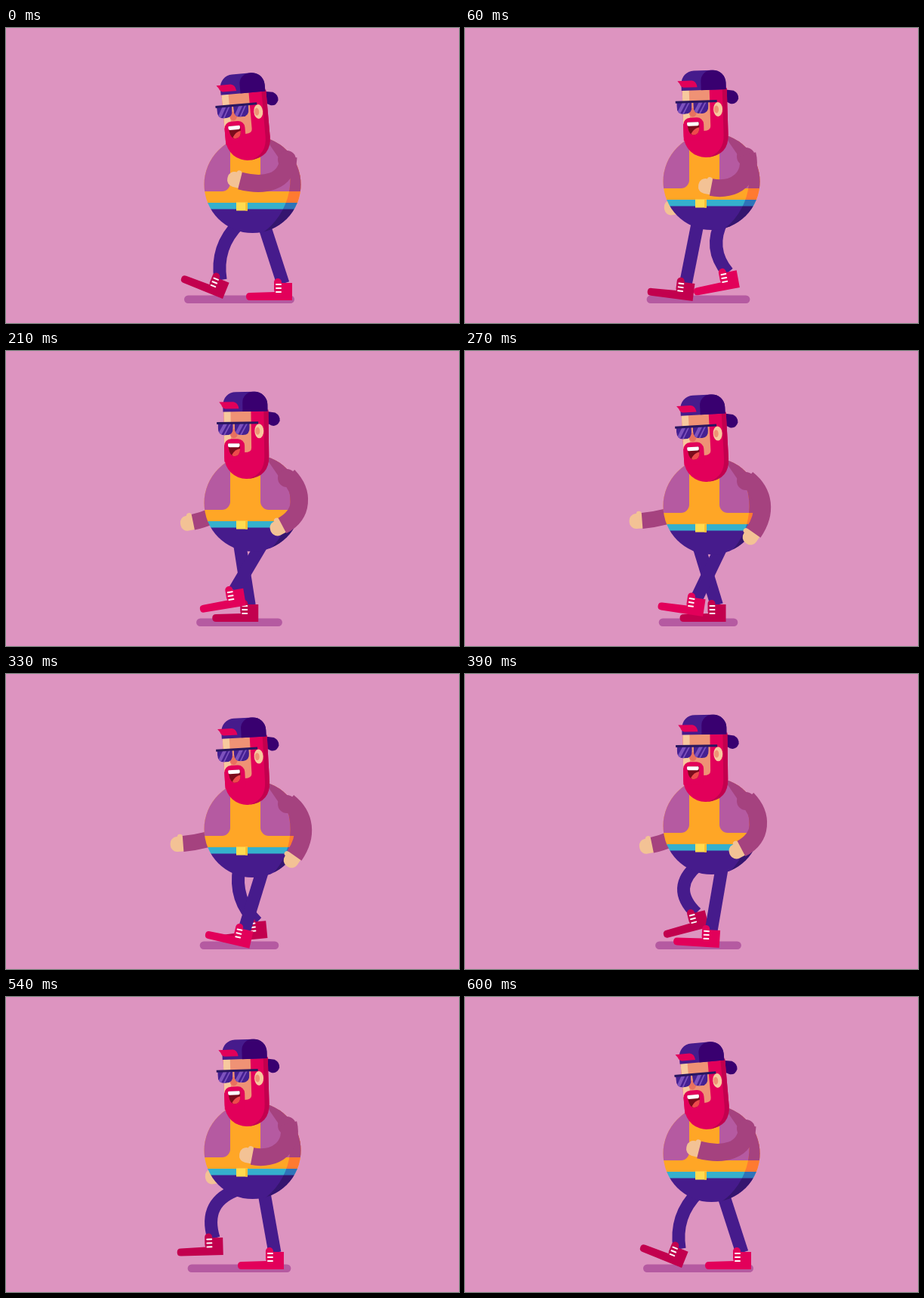
An HTML page with a canvas for the animation above (630 ms loop, 600 by 390 pixels).

```html
<!DOCTYPE html>
<html lang="en">
<head>
<meta charset="utf-8">
<title>Walk cycle</title>
<style>
html, body { margin: 0; width: 100%; height: 100%; overflow: hidden; background: #dd94c0; }
canvas { display: block; }
</style>
</head>
<body>
<canvas id="stage" width="600" height="390"></canvas>
<script>
const ctx = document.getElementById('stage').getContext('2d');
const { PI, sin, cos, max, min, hypot } = Math;
const STEP = 30, STEPS = 20, LOOP = 630;
const PURPLE = '#461b8c', DEEP = '#35156f', CAP = '#390070';
const RED = '#e2005a', DARK_RED = '#c2004e';
const SLEEVE = '#a5427f', JACKET = '#b55aa1';
const SKIN = '#f3c295', LIGHT_SKIN = '#f7c99e', DARK_SKIN = '#ef9275';

function fill(color, path) {
  ctx.fillStyle = color;
  ctx.fill(new Path2D(path));
}

function stroke(color, width, path) {
  ctx.strokeStyle = color;
  ctx.lineWidth = width;
  ctx.stroke(new Path2D(path));
}

function ellipse(color, x, y, rx, ry = rx) {
  ctx.fillStyle = color;
  ctx.beginPath();
  ctx.ellipse(x, y, rx, ry, 0, 0, 7);
  ctx.fill();
}

function box(color, x, y, w, h, r = 0) {
  ctx.fillStyle = color;
  ctx.beginPath();
  ctx.roundRect(x, y, w, h, r);
  ctx.fill();
}

function at(x, y, angle, draw) {
  ctx.save();
  ctx.translate(x, y);
  ctx.rotate(angle);
  draw();
  ctx.restore();
}

// Heel position and foot angle: swinging for the first half, planted for the second.
function stride(phase) {
  const q = phase % 10 / 10;
  if (phase < 10) {
    const u = 1 - (1 - q) ** 1.7;
    return {
      x: 379 - 64 * u * u * (3 - 2 * u),
      y: 360 - 29 * sin(PI * q),
      degrees: 22 * q ** 4 - 18 * sin(PI * q)
    };
  }
  return {
    x: 315 + 64 * q + 3 * sin(PI * q),
    y: 360 + 3 * sin(PI * (1 - q) ** 4),
    degrees: 22 * (1 - q) ** 5
  };
}

function shoe(color) {
  box(color, -24, -29, 10, 20, 5);
  fill(color, 'M0 0H-56Q-61 0 -61 -5Q-61 -10 -56 -10L-23 -11V-19L-14 -23H0Z');
  for (let y = -22; y < -10; y += 5) box('#fff', -22, y, 8, 2, 1);
}

function leg(phase, hipX, hipY, shiftX, shiftY, bend, color) {
  const foot = stride(phase), a = foot.degrees * PI / 180;
  const x = foot.x + shiftX, y = foot.y + shiftY;
  const ankleX = x - 12 * cos(a) + 22 * sin(a), ankleY = y - 12 * sin(a) - 22 * cos(a);
  const dx = ankleX - hipX, dy = ankleY - hipY, k = max(0, bend) / hypot(dx, dy);
  const kneeX = hipX + dx / 2 - dy * k, kneeY = hipY + dy / 2 + dx * k;
  stroke(PURPLE, 17, `M${hipX} ${hipY}Q${kneeX} ${kneeY} ${ankleX} ${ankleY}`);
  at(x, y, a, () => shoe(color));
}

function arm(shoulderX, shoulderY, elbowX, elbowY, x, y, angle, width) {
  at(x, y, angle, () => {
    box(SKIN, -1, -10, 18, 20, [0, 9, 9, 2]);
    box(SKIN, 0, 2, 7, 11, 3.5);
  });
  const wristX = x - 32 * cos(angle), wristY = y - 32 * sin(angle);
  stroke(SLEEVE, width,
    `M${shoulderX} ${shoulderY}C${elbowX} ${elbowY} ${wristX} ${wristY} ${x} ${y}`);
}

function backArm(s) {
  arm(300, 202, 285, 206, 294 - 66 * s, 233 - 18 * s * s, PI - 0.25 * sin(PI * s), 21);
}

function frontArm(s) {
  const out = 1 - (1 - s) ** 2;
  ellipse(SLEEVE, 372, 166, 12);
  arm(374, 163, 373 + 24 * out, 197 - 18 * s,
    310 + 80 * s, 194 + 68 * s - 26 * s * s, PI + 0.25 - 1.5 * s * s, 23);
}

function clothes(jacket, shirt, belt, pants) {
  box(shirt, 260, 130, 132, 94);
  box(jacket, 250, 130, 47, 78, [0, 0, 11, 0]);
  box(jacket, 337, 130, 60, 78, [0, 0, 0, 11]);
  box(belt, 260, 223, 132, 9);
  box(pants, 260, 231.5, 132, 34);
}

function body(s) {
  at(0, 0, 0, () => {
    ctx.beginPath();
    ctx.arc(326.5, 199, 64, 0, 7);
    ctx.clip();
    clothes(JACKET, '#ffa626', '#35b0cd', PURPLE);
    at(0, 0, 0, () => {
      ctx.beginPath();
      ctx.rect(250, 120, 150, 150);
      ctx.arc(290, 192 + 8 * s, 86.5, 0, 7);
      ctx.clip('evenodd');
      clothes(SLEEVE, '#ff7a30', '#2e74b9', DEEP);
    });
    fill(SLEEVE, 'M338 130L362 165H395V130Z');
  });
  box('#ffdb50', 305, 222.5, 15, 11);
  box('#ffbf35', 317, 222.5, 3, 11);
}

function lens(x) {
  at(x, 93, 0, () => {
    ctx.clip(new Path2D('M0 0H20V6Q20 16 11 16H9Q0 16 0 6Z'));
    box('#452092', 0, 0, 20, 16);
    fill('#7d52bd', 'M8 0H13L4 16H-1ZM16 0H18L9 16H7Z');
  });
}

function head() {
  fill(CAP, 'M345 78L357 80Q364 84 363 91Q360 99 352 97L345 93Z');
  // hair, beard and its shaded side
  box(RED, 289, 76, 59, 91, [0, 0, 29, 29]);
  fill(DARK_RED, 'M342 77H348V138Q348 165 320 167Q342 161 342 138Z');
  // face
  fill(DARK_SKIN, 'M289 76H325V126Q325 132 316 132L306 122H289Z');
  box(LIGHT_SKIN, 289, 76, 9, 46);
  ellipse('#e8715f', 302, 107, 5, 6);
  box(RED, 289, 114, 27, 30, [9, 9, 0, 0]);
  ellipse(LIGHT_SKIN, 335.5, 104, 6, 9.5);
  ellipse(DARK_SKIN, 333.5, 104, 3, 5);
  // mouth
  fill('#7c0b1c', 'M294 120H310V127Q310 137 302 137Q296 136 295 127Z');
  fill('#ee4a4c', 'M310 127Q310 137 302 137Q300 137 299 135Q303 128 310 127Z');
  box('#fff', 294, 120, 15.5, 5, [1, 1, 2, 2]);
  // sunglasses
  lens(281);
  lens(303);
  box('#291660', 279.5, 91.5, 55, 3);
  // cap
  box(PURPLE, 288, 52, 59, 26, [17, 17, 0, 0]);
  box(CAP, 314, 52, 33, 26, [14, 17, 0, 0]);
  fill(RED, 'M283 65H302Q308 66 309 74H291Q287 73 286 69Z');
}

function draw(n) {
  const swing = min(n, STEPS - n), s = swing / 10;
  const lift = min(swing, 10 - swing) / 5;
  const bob = 8 - 10 * lift;
  const half = 73 - 23 * s;
  const backPhase = (n + 10) % STEPS;

  ctx.fillStyle = '#dd94c0';
  ctx.fillRect(0, 0, 600, 390);
  box('#b55aa1', 309 - half, 353.5, half * 2, 10.5, 5.25);

  at(0, bob, 0, () => backArm(s));
  leg(backPhase, 309, 250 + bob, -28, -2, 44 * sin(PI * (backPhase + 1) / 13), DARK_RED);
  leg(n, 341, 250 + bob, 0, 0, n < 7 ? 30 * sin(PI * n / 7) : 0, RED);
  at(0, bob, 0, () => {
    body(s);
    frontArm(s);
    at(318, 118, -5 * (1 - lift) ** 2 * PI / 180, () => {
      ctx.translate(-318, -118);
      head();
    });
  });
}

function tick(now) {
  draw(Math.floor(now % LOOP / STEP) % STEPS);
  requestAnimationFrame(tick);
}
tick(0);
</script>
</body>
</html>
```
